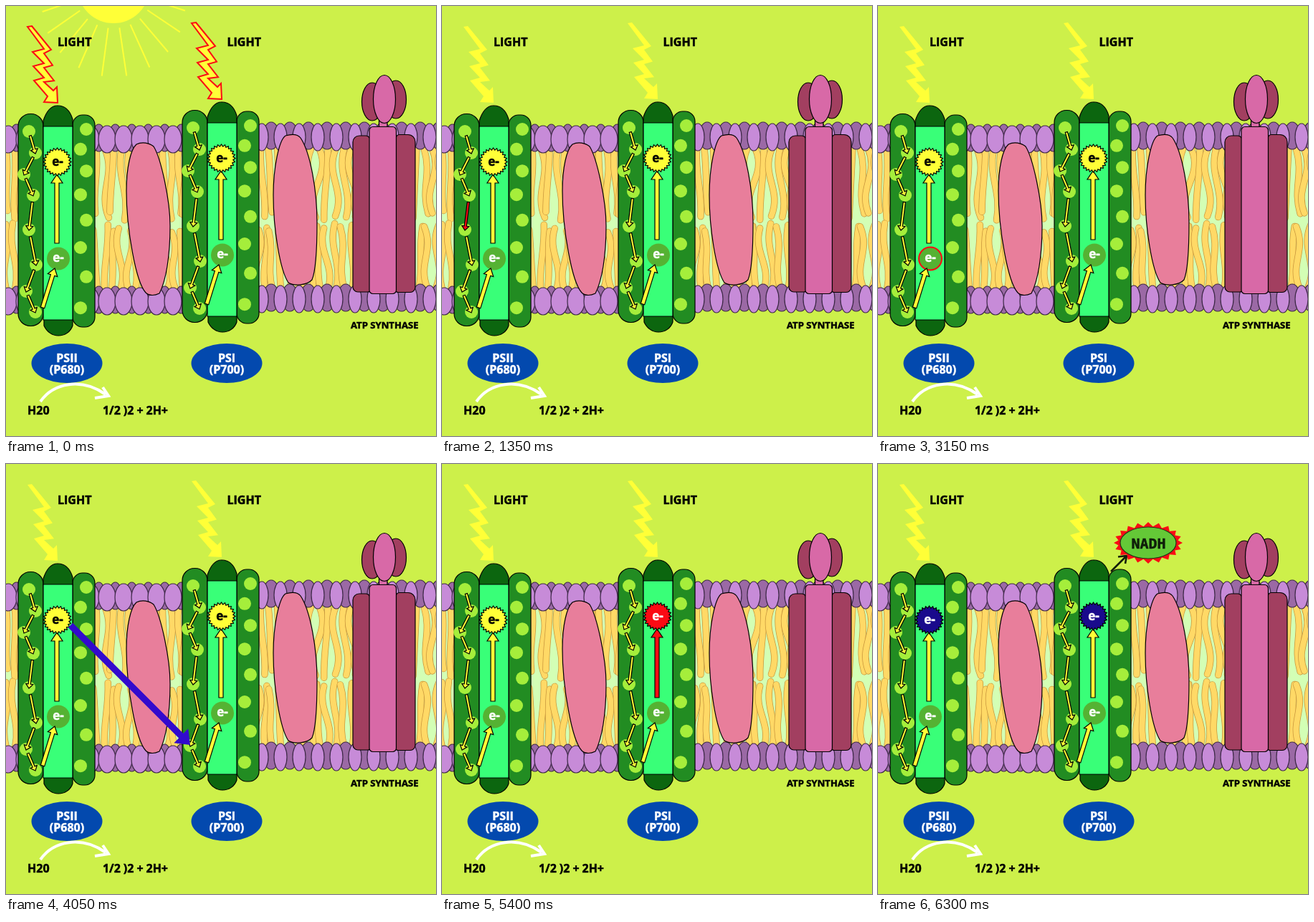
Recreate the animation shown at these times as an HTML page with a canvas. Size 600 by 600 pixels, loop 6.75 s.

```html
<!DOCTYPE html>
<html lang="en">
<head>
<meta charset="utf-8">
<title>Light reactions</title>
<style>
html, body { margin: 0; width: 100%; height: 100%; overflow: hidden; background: #cdf04a; }
canvas { display: block; width: 600px; height: 600px; }
</style>
</head>
<body>
<canvas id="stage" width="600" height="600"></canvas>
<script>
const ctx = document.getElementById('stage').getContext('2d');
const STEP = 450, STEPS = 15;
const YELLOW = '#ffff37', RED = '#fb0a14', NAVY = '#190a8c', BLUE = '#320acd';
const GREEN = '#228c22', DEEP = '#0c660f', DOT = '#a5ee3b';
const PINK = '#e87e9b', WINE = '#a23f60', ROSE = '#d869a7';

function paint(fill, stroke, width = 1.2) {
  if (fill) { ctx.fillStyle = fill; ctx.fill(); }
  if (stroke) { ctx.strokeStyle = stroke; ctx.lineWidth = width; ctx.stroke(); }
}

function oval(x, y, rx, ry, fill, stroke, width) {
  ctx.beginPath();
  ctx.ellipse(x, y, rx, ry, 0, 0, Math.PI * 2);
  paint(fill, stroke, width);
}

function polygon(points, fill, stroke, width) {
  ctx.beginPath();
  points.forEach(p => ctx.lineTo(...p));
  ctx.closePath();
  paint(fill, stroke, width);
}

function shape(d, fill, stroke, width = 1.2) {
  const p = new Path2D(d);
  if (fill) { ctx.fillStyle = fill; ctx.fill(p); }
  if (stroke) { ctx.strokeStyle = stroke; ctx.lineWidth = width; ctx.stroke(p); }
}

function box(x, y, w, h, r, fill) {
  ctx.beginPath();
  ctx.roundRect(x, y, w, h, r);
  paint(fill, '#000');
}

// A thin stroke gives the lettering its extra weight.
function text(s, x, y, size, color = '#000', align = 'left', family = '"Open Sans", sans-serif') {
  ctx.font = `bold ${size}px ${family}`;
  ctx.textAlign = align;
  ctx.fillStyle = ctx.strokeStyle = color;
  ctx.lineWidth = 0.5;
  ctx.fillText(s, x, y);
  ctx.strokeText(s, x, y);
}

function arrow(x0, y0, x1, y1, shaft, head, len, fill, stroke) {
  ctx.save();
  ctx.translate(x0, y0);
  ctx.rotate(Math.atan2(y1 - y0, x1 - x0));
  const n = Math.hypot(x1 - x0, y1 - y0), m = n - len;
  polygon([[0, -shaft], [m, -shaft], [m, -head], [n, 0], [m, head], [m, shaft], [0, shaft]], fill, stroke);
  ctx.restore();
}

function burst(x, y, rx, ry, depth, spikes, fill, stroke) {
  const points = Array.from({ length: spikes * 2 }, (_, i) => {
    const a = i * Math.PI / spikes, k = i % 2 ? depth : 0;
    return [x + (rx - k) * Math.cos(a), y + (ry - k) * Math.sin(a)];
  });
  polygon(points, fill, stroke);
}

function randomizer(seed) {
  return () => (seed = (seed * 16807) % 2147483647) / 2147483647;
}

function tails() {
  const rnd = randomizer(4711), spread = n => (rnd() - 0.5) * n;
  ctx.fillStyle = '#d3ffb5';
  ctx.fillRect(0, 200, 600, 194);
  ctx.lineCap = 'round';
  for (const [root, tip] of [[200, 292], [394, 309]]) {
    for (let x = 0; x < 608; x += 10 + rnd() * 3) {
      const end = tip + spread(14), dx = spread(12), bend = spread(34), h = end - root;
      ctx.beginPath();
      ctx.moveTo(x, root);
      ctx.bezierCurveTo(x + bend, root + h * 0.4, x + dx - bend, root + h * 0.6, x + dx, end);
      paint(null, '#c8963c', 9.5);
      paint(null, '#ffd966', 8);
    }
  }
  ctx.lineCap = 'butt';
}

// Dark heads sit half a step behind the light ones.
function heads(from, to, step, y, dark, light) {
  for (let x = from - step / 2; x < to; x += step) oval(x, y - 2, dark, 19, '#9b69a5', '#3c2846');
  for (let x = from; x < to; x += step) oval(x, y, light, 19, '#c78bd8', '#3c2846');
}

function membrane() {
  tails();
  for (const y of [186, 412]) {
    heads(3, 250, 23, y, 9, 12);
    heads(357, 620, 26, y - 3, 11, 9);
  }
}

function proteins() {
  shape('M182 193C190 189 200 191 206 196C216 212 229 270 229 307C229 350 223 384 214 401C208 404 200 405 195 400C181 385 168 310 168 258C168 225 174 200 182 193Z', PINK, '#000');
  shape('M390 181C400 178 407 179 411 184C425 205 434 258 434 302C434 340 432 370 427 382C420 390 402 391 394 386C382 368 373 310 373 264C373 225 381 187 390 181Z', PINK, '#000');
  box(484, 181, 24, 218, [9, 6, 3, 7], WINE);
  box(544, 179.5, 27, 220, [5, 10, 7, 3], WINE);
  box(520.5, 158, 11.5, 14, 0, ROSE);
  box(507, 168.5, 37.5, 233, 5, ROSE);
  oval(511, 133.5, 14.5, 26.5, WINE, '#000');
  oval(544, 130.5, 14.5, 26.5, WINE, '#000');
  oval(528, 130, 15.5, 33.5, ROSE, '#000');
}

function bolt(outlined) {
  const left = [[30, 29]], right = [[36, 28]];
  for (let i = 0; i < 3; i++) {
    const y = 20 * i;
    left.push([53, 60 + y], [37 + i, 64 + y]);
    right.push([63 + 2 * i, 61 + y * 1.08], [53, 66 + y]);
  }
  const tip = [[66, 118], [71, 113], [72, 135], [53, 134], [58, 126]];
  polygon([...right, ...tip, ...left.reverse()], YELLOW, outlined && RED, 2);
}

const STOPS = [[32, 175], [41, 205], [25, 235], [38, 264], [32, 312], [42, 361], [28, 398], [41, 427]];

// hot(i): hop i is lit; ring: circle round the electron; star, lift: colours
function photosystem({ hot, ring, star, lift, outlined }) {
  const tint = i => hot(i) ? RED : YELLOW;
  box(17, 150.5, 35, 296, 17, GREEN);
  box(93, 152, 31, 296, 14, GREEN);
  shape('M52 169V160C56 148 63 139 72 139C84 139 90 148 93 158V169Z', DEEP, '#000');
  shape('M53 437V446C57 455 65 460 73 460C82 460 90 455 93 446V437Z', DEEP, '#000');
  box(52, 168, 41, 270, 0, '#39ff78');
  STOPS.forEach(([x, y], i) => {
    oval(x, y, 9, 9, DOT);
    oval(108 + 4 * Math.cos(i * Math.PI), 172 + 26.5 * i + 1.3 * i * i, 9, 9, DOT);
  });
  STOPS.slice(1).forEach(([x, y], i) => {
    const [px, py] = STOPS[i];
    arrow(px + (x - px) * 0.2, py + (y - py) * 0.2, x, y + 1, 1.6, 5, 6, tint(i), '#000');
  });
  oval(73, 352.5, 16, 16, '#55b233', ring && RED, 2);
  arrow(51, 421, 68, 366, 2.8, 7, 10, tint(7), '#000');
  arrow(71, 331, 71, 235, 3, 8, 12, lift, '#000');
  burst(71.5, 217.5, 19.5, 19.5, 3, 24, star, '#000');
  text('e-', 73, 357, 17, '#fff', 'center');
  text('e-', 72, 223, 17, star === YELLOW ? '#000' : '#fff', 'center');
  bolt(outlined);
}

function sun() {
  oval(150, -26.5, 50.5, 50.5, YELLOW);
  for (let i = 0; i < 10; i++) {
    const a = (18 + 15.9 * i) * Math.PI / 180, len = 105 + 20 * Math.sin(i * Math.PI / 9);
    ctx.beginPath();
    ctx.moveTo(150 + 57 * Math.cos(a), -26 + 57 * Math.sin(a));
    ctx.lineTo(150 + len * Math.cos(a), -26 + len * Math.sin(a));
    paint(null, YELLOW, 2);
  }
}

function labels() {
  text('LIGHT', 72, 56, 16);
  text('LIGHT', 308.5, 56, 16);
  text('ATP SYNTHASE', 481, 450, 13.1);
  for (const [x, a, b] of [[85, 'PSII', '(P680)'], [308, 'PSI', '(P700)']]) {
    oval(x, 498.5, 49.5, 27.5, '#0349ae');
    text(a, x, 497, 16, '#fff', 'center');
    text(b, x, 513, 16, '#fff', 'center');
  }
  text('H20', 30, 570, 16);
  text('1/2 )2 + 2H+', 135, 570, 15.9);
  shape('M48 552C66 526 105 518 139 542M124 547L143 544L135 532', null, '#fff', 4);
}

function nadh(glow) {
  shape('M325 150L346 129M335 129.5L347 128L345 139', null, '#141e0a', 2.6);
  if (glow) burst(377, 110, 48, 29, 6, 20, RED);
  oval(377, 110, 39, 22, '#64c837', '#1e3c14');
  text('NADH', 377.5, 118, 20, '#0f1e0a', 'center', '"DejaVu Sans Mono", monospace');
}

// The step in which each hop of the first photosystem lights up.
const HOP_STEP = [1, 2, 2, 3, 4, 5, 6, 6];

function draw(k) {
  const outlined = k === 0, rest = k === 14 ? NAVY : YELLOW;
  const excited = step => k === step ? { star: RED, lift: RED } : { star: rest, lift: YELLOW };
  ctx.fillStyle = '#cdf04a';
  ctx.fillRect(0, 0, 600, 600);
  if (k === 0) sun();
  membrane();
  proteins();
  photosystem({ hot: i => HOP_STEP[i] === k, ring: k === 7, outlined, ...excited(8) });
  ctx.save();
  ctx.translate(229, -5);
  photosystem({ hot: () => k === 10, ring: k === 11, outlined, ...excited(12) });
  ctx.restore();
  labels();
  if (k === 9) arrow(90, 225, 257, 392, 4.5, 14, 18, BLUE);
  if (k >= 13) nadh(k === 14);
}

const start = performance.now();
let shown = -1;
function tick() {
  const k = Math.floor((performance.now() - start) / STEP) % STEPS;
  if (k !== shown) draw(shown = k);
  requestAnimationFrame(tick);
}
tick();
</script>
</body>
</html>
```
